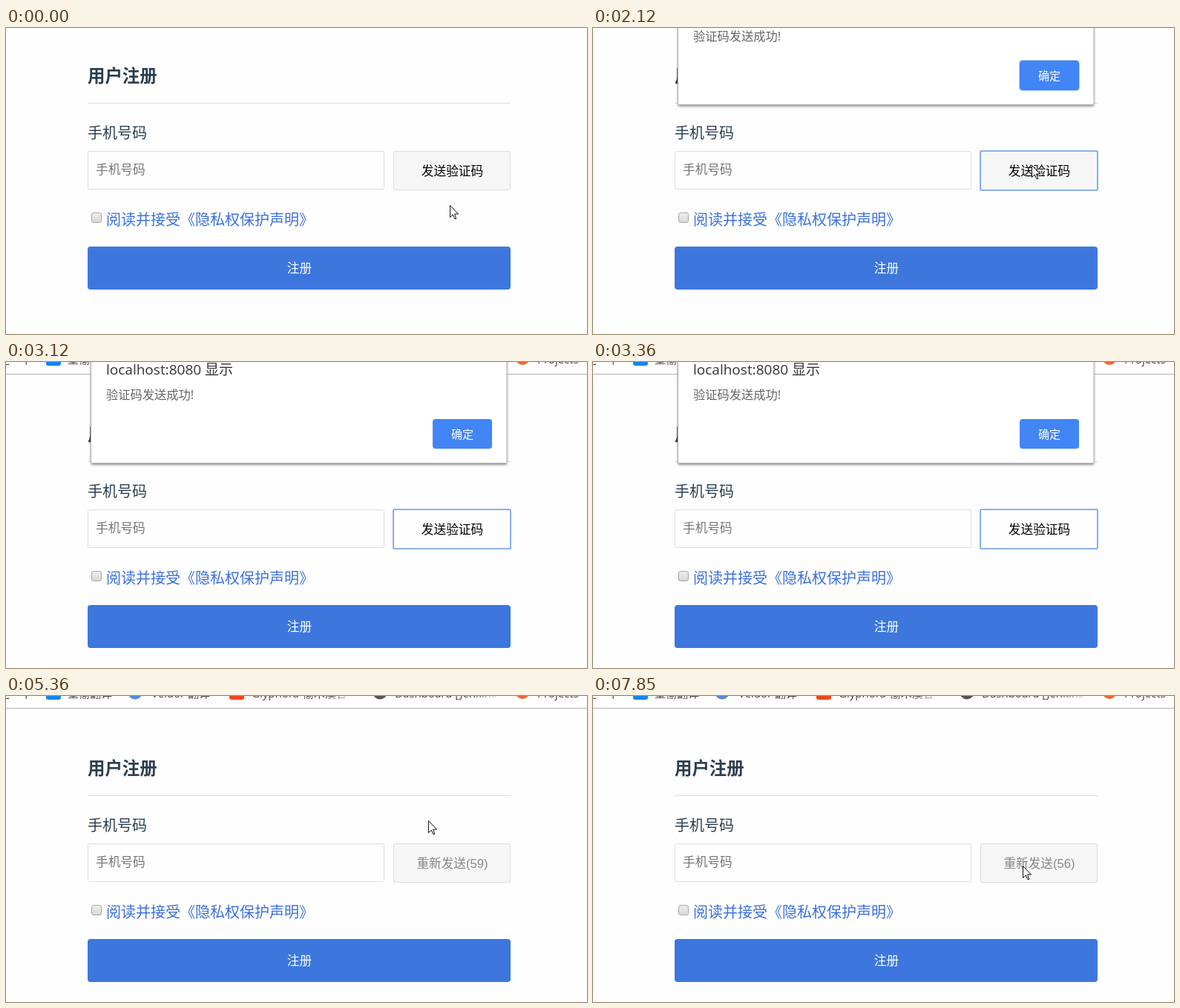
An HTML page that plays this animation: 783 by 413 pixels, repeating every 8 s.

```html
<!DOCTYPE html>
<html lang="zh-CN">
<head>
<meta charset="utf-8">
<title>用户注册</title>
<style>
  html, body { margin: 0; width: 100%; height: 100%; overflow: hidden; background: #fefefe; }
  svg { display: block; }
  text { font-family: "Liberation Sans", "Noto Sans CJK SC", "Noto Sans CJK", sans-serif; font-size: 16.67px; white-space: pre; }
  .ink { fill: #2c3e50; }
  .mid { text-anchor: middle; }
  .ui text { font-family: "Open Sans", "Noto Sans CJK SC", "Noto Sans CJK", sans-serif; }
  #marks text { font-size: 15px; fill: #444; }
</style>
</head>
<body>
<svg width="783" height="413" viewBox="0 0 783 413">
  <defs>
    <linearGradient id="fade">
      <stop offset="0" stop-color="#fefefe" stop-opacity="0"/>
      <stop offset="1" stop-color="#fefefe"/>
    </linearGradient>
    <linearGradient id="box" x2="0" y2="1">
      <stop offset="0" stop-color="#eee"/>
      <stop offset="1" stop-color="#d8d8d8"/>
    </linearGradient>
    <filter id="shadow" x="-5%" y="-5%" width="110%" height="115%">
      <feDropShadow dx="0" dy="2" stdDeviation="1.5" flood-color="#000" flood-opacity=".4"/>
    </filter>
  </defs>

  <g id="page">
    <!-- bookmark bar -->
    <g id="marks" class="ui">
      <text x="-10" y="-31">之</text>
      <text x="20" y="-31">下</text>
      <rect x="54" y="-48" width="20" height="20" rx="3" fill="#1285f5"/>
      <text x="83" y="-31">墨榆翻译</text>
      <circle cx="174" cy="-38" r="9.5" fill="#5b87dc"/>
      <text x="196" y="-31">Veldor 翻译</text>
      <rect x="301" y="-48" width="20" height="20" rx="3" fill="#f5431d"/>
      <text x="331" y="-31">Glyphora-榆木溪谷</text>
      <circle cx="504" cy="-38" r="9.5" fill="#5a5352"/>
      <text x="524" y="-31">Dashboard [Jenkins</text>
      <circle cx="696" cy="-38" r="9" fill="#f0652f"/>
      <text x="716" y="-31">Projects</text>
      <rect x="430" y="-50" width="45" height="26" fill="url(#fade)"/>
      <rect x="475" y="-50" width="18" height="26" fill="#fefefe"/>
      <rect x="632" y="-50" width="36" height="26" fill="url(#fade)"/>
      <rect x="668" y="-50" width="18" height="26" fill="#fefefe"/>
      <rect x="-2" y="-17" width="790" height="1" fill="#b4b4b4"/>
    </g>

    <!-- form -->
    <text class="ink" x="110" y="72.5" style="font-size:23.4px;font-weight:700">用户注册</text>
    <rect x="110" y="101" width="570" height="1" fill="#ddd"/>
    <text class="ink" x="110" y="148.5" style="font-size:20px">手机号码</text>
    <rect x="110.5" y="166.5" width="399" height="51" rx="2" fill="#fefefe" stroke="#ddd"/>
    <text x="121" y="197" fill="#757575">手机号码</text>
    <rect id="send" x="522.5" y="166.5" width="157" height="52" rx="1.5" stroke="#ddd"/>
    <rect id="focus" x="522" y="166" width="158" height="53" rx="1" fill="none" stroke="#6a9fee" stroke-width="1.6"/>
    <text id="label" class="mid" x="601.5" y="199"></text>
    <rect x="115.5" y="249.5" width="13" height="13" rx="2.5" fill="url(#box)" stroke="#a8a8a8"/>
    <text x="135" y="266" fill="#3a70e0" style="font-size:20px">阅读并接受《隐私权保护声明》</text>
    <rect x="110" y="295" width="570" height="58" rx="4" fill="#3d77dd"/>
    <text class="mid" x="395.5" y="330" fill="#fff">注册</text>

    <!-- alert -->
    <g id="alert" class="ui">
      <rect x="114.5" y="-90" width="560.5" height="193.5" rx="2" fill="#fff" stroke="#b0b0b0" filter="url(#shadow)"/>
      <text x="135" y="-16" fill="#333" style="font-size:19px">localhost:8080 显示</text>
      <text x="135" y="17" fill="#646464" style="font-size:16.25px">验证码发送成功!</text>
      <rect id="ring" x="574" y="43" width="82" height="42" rx="5" fill="#b4cffb"/>
      <rect x="575" y="44" width="80" height="40" rx="4" fill="#4285f4"/>
      <text class="mid" x="615" y="70" fill="#fff" style="font-size:15px">确定</text>
    </g>
  </g>

  <path id="cursor" d="M.5 .5V16.5L4.2 13L6.8 18.5H8.7L6.6 12H11.5Z" fill="#fff" stroke="#111"/>
</svg>
<script>
  const LOOP = 8000, STEP = 120, COUNT_FROM = 4960, SECOND = 963;
  const $ = id => document.getElementById(id);

  // Progress 0..1 of a move that reaches its end at `end` after n screen updates.
  const glide = (t, end, n) =>
    Math.min(1, Math.max(0, n + Math.floor((t - end) / STEP)) / n);

  // Mouse strokes: arrival time, screen updates on the way, destination.
  const home = { x: 598, y: 239 };
  const strokes = [
    { end: 900, n: 2, x: 598, y: 196 },
    { end: 2120, n: 1, x: 591, y: 185 },
    { end: 2510, n: 3, x: 467, y: -40 },
    { end: 3510, n: 1, x: 548, y: 82 },
    { end: 3630, n: 1, x: 642, y: 108 },
    { end: 4050, n: 3, x: 586, y: 141 },
    { end: 4530, n: 4, x: 563, y: 183 },
    { end: 4960, n: 2, x: 569, y: 168 },
    { end: 5480, n: 1, x: 574, y: 165 },
    { end: 5780, n: 2, x: 570, y: 164 },
    { end: 7420, n: 3, x: 579, y: 229 }
  ];

  function pointer(t) {
    let { x, y } = home;
    for (const s of strokes) {
      const p = glide(t, s.end, s.n);
      x += (s.x - x) * p;
      y += (s.y - y) * p;
    }
    return [Math.round(x), Math.round(y)];
  }

  const move = (id, x, y) => $(id).setAttribute('transform', `translate(${x} ${y})`);
  const set = (id, name, value) => $(id).setAttribute(name, value);

  function draw(t) {
    const slide = Math.round(33 * (1 - (1 - glide(t, 3210, 3)) ** 4));
    const shown = (glide(t, 1440, 3) - glide(t, 4170, 2)) ** 3;
    const counting = t >= COUNT_FROM;
    const focused = t >= 1200 && !counting;

    move('cursor', ...pointer(t));
    move('page', slide % 33 ? -1 : 0, slide);
    move('alert', 0, -22 * (1 - shown));
    set('alert', 'opacity', shown);
    set('ring', 'opacity', t < 2820 || t >= 3780 ? 1 : 0);
    set('focus', 'opacity', focused ? 1 : 0);
    set('send', 'fill', focused && slide === 33 ? '#fefefe' : '#f6f6f6');
    set('label', 'fill', counting ? '#868686' : '#000');
    $('label').textContent = counting
      ? `重新发送(${59 - Math.floor((t - COUNT_FROM) / SECOND)})`
      : '发送验证码';
  }

  const start = performance.now();
  function tick() {
    draw((performance.now() - start) % LOOP);
    requestAnimationFrame(tick);
  }
  tick();
</script>
</body>
</html>
```
